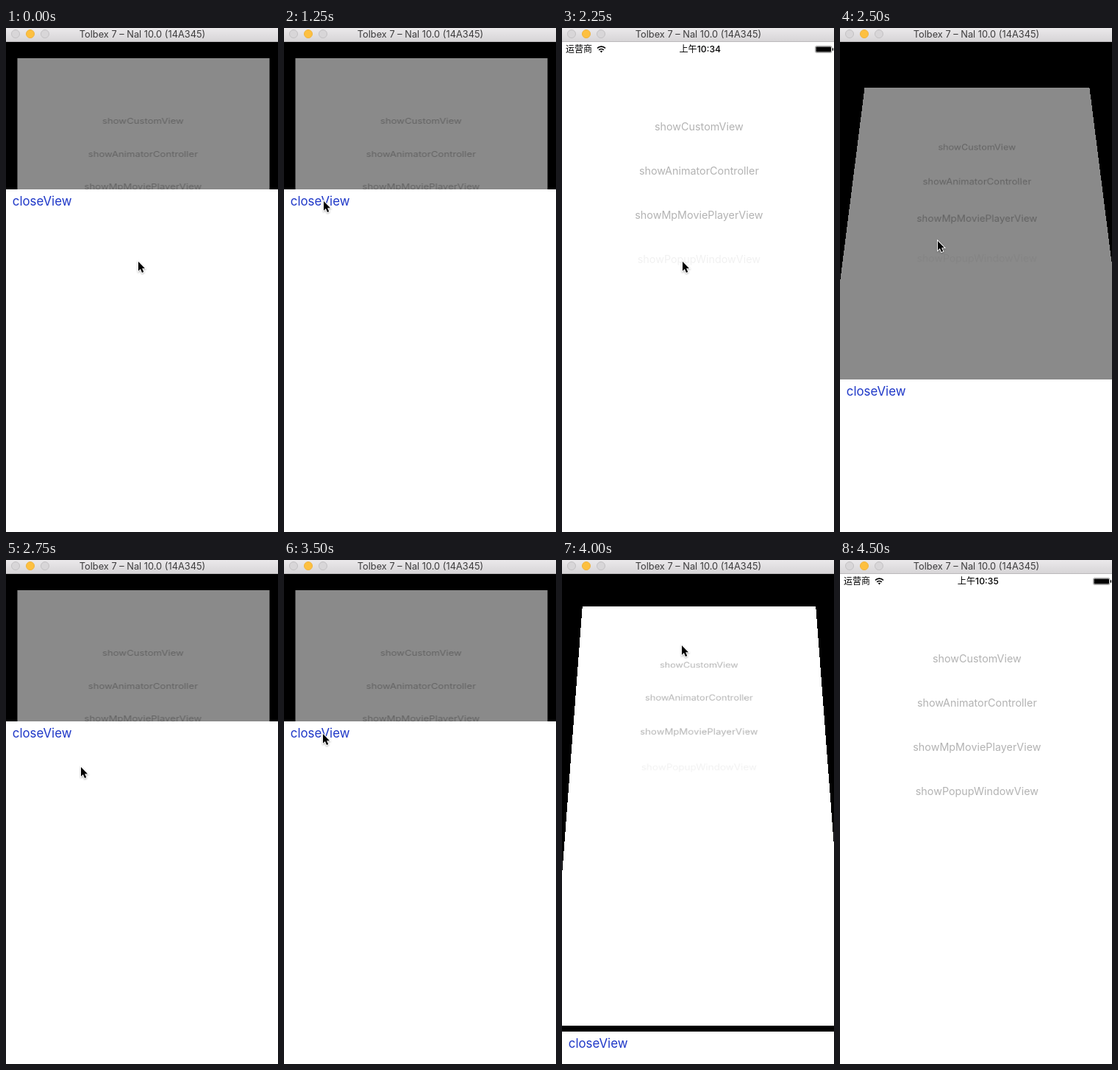
Write an HTML page that moves like this. It is 370x684 px and loops after 5 s.

```html
<!DOCTYPE html>
<html lang="zh">
<head>
<meta charset="utf-8">
<title>Sheet transition</title>
<style>
  html, body { margin: 0; width: 100%; height: 100%; overflow: hidden; background: #000; }
  body { position: relative; font-family: Inter, "Noto Sans CJK SC", "Noto Sans CJK", sans-serif; }
  body * { position: absolute; white-space: nowrap; }
  #card { left: 0; top: 0; width: 372.8px; height: 667px; background: #fff; transform-origin: 0 0; }
  #card b { left: 0; width: 100%; font: 14.35px/20px Inter, sans-serif; text-align: center; color: #b3b3b3; }
  #card.shaded::after { content: ""; position: absolute; inset: 0; background: rgba(0, 0, 0, .457); }
  #card .pressed { color: #f1f1f1; }
  #sheet { left: 0; width: 370px; height: 684px; background: #fff; }
  #sheet span { left: 8.8px; top: 6px; font-size: 16.85px; line-height: 20px; color: #1f38c8; }
  #bar { left: 0; top: 0; width: 370px; height: 18px; background: linear-gradient(#ebe9eb, #d7d5d7); border-bottom: 1px solid #bcbabc; }
  #bar span { left: 0; width: 371px; top: -1px; text-align: center; font-size: 12.8px; line-height: 19px; color: #3c3b3c; }
  #bar i { box-sizing: border-box; top: 2px; width: 12px; height: 12px; border-radius: 50%; background: #d8d6d8; border: 1px solid #c3c1c3; }
  #bar .amber { background: #fdc040; border-color: #f0b33c; }
  #status span { top: 20px; font-size: 12px; line-height: 18px; color: #000; }
  #status #clock { left: 0; width: 375.5px; text-align: center; font-size: 12.2px; font-weight: 500; }
  svg { left: 0; top: 0; overflow: visible; }
</style>
</head>
<body>
<div id="card"></div>
<div id="status">
  <span style="left:5px">运营商</span>
  <span id="clock"></span>
  <svg width="370" height="40" fill="none" stroke="#000">
    <path d="M48 27.5a7.6 7.6 0 0 1 11 0M50.2 29.9a4.6 4.6 0 0 1 6.6 0" stroke-width="1.7"/>
    <path d="M53.5 33.4l-1.7-1.8a2.4 2.4 0 0 1 3.4 0z" fill="#000" stroke="none"/>
    <rect x="344.5" y="24.5" width="22.5" height="9" rx="1.8" stroke-opacity=".35"/>
    <rect x="345.5" y="25.5" width="20.5" height="7" rx=".8" fill="#000" stroke="none"/>
    <path d="M368.4 27.3v3.4" stroke-width="1.4"/>
  </svg>
</div>
<div id="sheet"><span>closeView</span></div>
<div id="bar">
  <i style="left:7px"></i><i class="amber" style="left:27px"></i><i style="left:47px"></i>
  <span>Tolbex 7 – Nal 10.0 (14A345)</span>
</div>
<svg id="cursor" width="14" height="20">
  <path d="M0 0V12.7L2.9 10.1L5 15L7.3 14L5.1 9.2H9Z" stroke="#fff" stroke-width="1.8" paint-order="stroke"
    style="filter:drop-shadow(0 1px 1px rgba(0,0,0,.3))"/>
</svg>
<script>
const LOOP = 5000, STEP = 250, WIDTH = 372.8;
const $ = id => document.getElementById(id);

// Card poses: top edge, scale at the top, vertical factor, tilt
const HOME = [19, 1, 1, 0];
const REST = [41, .917, .809, 0];
const RISE = [81, .82, .749, .000668];
const FALL = [62.5, .851, .765, .000378];
const SHEET_OPEN = 219, SHEET_FALLEN = 640, SHEET_GONE = 700;

const falling = y => {
  const p = (y - SHEET_OPEN) / (SHEET_FALLEN - SHEET_OPEN);
  return REST.map((v, i) => v + (FALL[i] - v) * p);
};

// Start time, sheet top, card pose, shaded
const scenes = [
  [0, SHEET_OPEN, REST, true],
  [1500, 404, falling(404), false],
  [1750, SHEET_GONE, HOME, false],
  [2500, 477, RISE, true],
  [2750, SHEET_OPEN, REST, true],
  [3750, 254, falling(254), false],
  [4000, SHEET_FALLEN, FALL, false],
  [4250, SHEET_GONE, HOME, false],
];

// Pointer tip at every step; it is gone after the last one
const pointer = [
  [180, 317], [171, 314], [151, 298], [64, 249], [54, 235], [54, 235], [78, 252],
  [161, 306], [162, 310], [164, 317], [133, 289], [102, 281], [59, 252],
  [52, 238], [53, 236], [53, 236], [163, 116],
];

const labels = ["showCustomView", "showAnimatorController", "showMpMoviePlayerView", "showPopupWindowView"]
  .map((text, i) => {
    const label = document.createElement("b");
    label.textContent = text;
    label.style.top = 105.3 + 60 * i + "px";
    return $("card").appendChild(label);
  });

function warp([top, scale, stretch, tilt]) {
  const w = 1 / scale, mid = WIDTH / 2;
  const m = [1, 0, 0, 0, -mid * tilt, stretch, 0, -tilt, 0, 0, 1, 0, mid * (w - 1), top * w, 0, w];
  return `matrix3d(${m.map(v => v.toFixed(7))})`;
}

function draw(now) {
  const step = Math.floor(now % LOOP / STEP), t = step * STEP;
  const [, sheetTop, pose, shaded] = scenes.findLast(s => s[0] <= t);
  $("card").style.transform = pose === HOME ? "translateY(19px)" : warp(pose);
  $("card").classList.toggle("shaded", shaded);
  labels[3].classList.toggle("pressed", t < 1750 || (t >= 2250 && t < 4250));
  $("sheet").style.top = sheetTop + "px";
  $("clock").textContent = t < 2500 ? "上午10:34" : "上午10:35";
  const tip = pointer[step];
  $("cursor").style.display = tip ? "" : "none";
  if (tip) $("cursor").style.transform = `translate(${tip[0]}px, ${tip[1]}px)`;
}

const start = performance.now();
function tick() {
  draw(performance.now() - start);
  requestAnimationFrame(tick);
}
tick();
</script>
</body>
</html>
```
